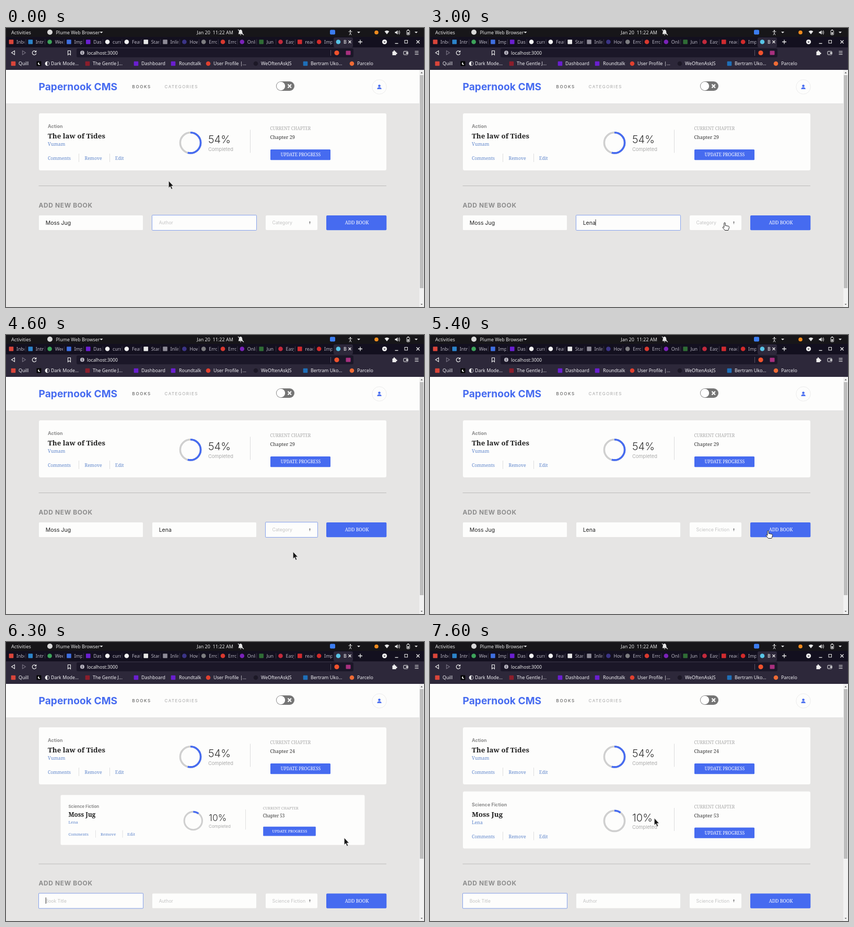
Write an HTML page that moves like this. It is 800x533 px and loops after 8 s.

```html
<!DOCTYPE html>
<html lang="en">
<head>
<meta charset="utf-8">
<title>Book manager demo</title>
<style>
html, body { margin: 0; width: 100%; height: 100%; overflow: hidden; background: #e6e5e4; }
#stage { display: block; width: 100%; height: 100%; }
text { white-space: pre; }
.ui { font-family: "Noto Sans", "Open Sans", sans-serif; }
.sans { font-family: Inter, "Open Sans", sans-serif; }
.slab { font-family: "Noto Serif", serif; font-weight: 300; }
.bold { font-weight: 700; }
.mid { font-weight: 500; }
.plain { font-weight: 400; }
.thin { font-weight: 300; }
</style>
</head>
<body>
<svg id="stage" viewBox="0 0 800 533">
  <g id="page"></g>
  <g id="chrome"></g>
  <g id="cursor"></g>
</svg>
<script>
const LOOP = 8000, STEP = 100;
const BLUE = '#466bf0', WHITE = '#fdfdfc', LINK = '#5f86cc', PALE = '#c4c4c4';
const STRIP = '#13101f', BAR = '#2d283a', FIELD = '#1b1728';
const SHIFT = 122.5;
const TITLE = 'Moss Jug', AUTHOR = 'Lena';

const $ = id => document.getElementById(id);
const rect = (x, y, w, h, fill, r = 0, more = '') =>
  `<rect x="${x}" y="${y}" width="${w}" height="${h}" rx="${r}" fill="${fill}" ${more}/>`;
const circle = (x, y, r, fill, more = '') =>
  `<circle cx="${x}" cy="${y}" r="${r}" fill="${fill}" ${more}/>`;
const path = (d, fill, more = '') => `<path d="${d}" fill="${fill}" ${more}/>`;
const line = (d, color, w = 1) => path(d, 'none', `stroke="${color}" stroke-width="${w}"`);
const text = (s, x, y, size, fill, cls, more = '') =>
  `<text x="${x}" y="${y}" font-size="${size}" fill="${fill}" class="${cls}" ${more}>${s}</text>`;
const down = (x, y, s = 3, fill = '#e8e8e8') =>
  path(`M${x - s} ${y - s / 2}h${2 * s}l${-s} ${s}z`, fill);
const move = (x, y, body) => `<g transform="translate(${x} ${y})">${body}</g>`;

// --- browser window ---

// label, icon colour, icon shape (c circle, s square)
const tabs = [
  ['Inbox', '#d9453a', 's'], ['Intro', '#2c83c9', 's'], ['Week', '#3da35a', 'c'],
  ['Impo', '#3f6fe0', 's'], ['Dash', '#6a1fd0', 's'], ['curre', '#f2f2f2', 'c'],
  ['Feat', '#f2f2f2', 'c'], ['Start', '#e6e6e6', 's'], ['Inline', '#8d8a96', 's'],
  ['How', '#3b3486', 'c'], ['Error', '#7d7d80', 'c'], ['Error', '#d8392f', 'c'],
  ['Onlin', '#7a22b8', 'c'], ['Jun', '#2f6b35', 's'], ['Easy', '#c22a3c', 'c'],
  ['react', '#cf2b2f', 's'], ['Impo', '#d22b2b', 'c'], ['B', '#58c4e6', 'c']
];

// label, text x, icon x, icon colour, shape
const bookmarks = [
  ['Quill', 24, 14, '#d9453a', 's'], ['Dark Mode...', 86, 79, '#f2f2f2', 'c'],
  ['The Gentle J...', 166, 156, '#8b1e2c', 's'], ['Dashboard', 259, 249, '#6a1fd0', 's'],
  ['Roundtalk', 331, 320, '#6a1fd0', 's'], ['User Profile |...', 397, 387, '#e0402f', 'c'],
  ['WeOftenAskJS', 488, 478, '#1c1826', 'c'], ['Bertram Uko...', 583, 573, '#1f6fb8', 's'],
  ['Parcelo', 672, 662, '#ef6b35', 'c']
];

const icon = (x, y, color, shape, r = 4.3) =>
  shape === 'c' ? circle(x, y, r, color) : rect(x - r, y - r, 2 * r, 2 * r, color, 1);

function panel() {
  const c = '#e6e6e6';
  return rect(0, 0, 800, 17, '#171619') +
    text('Activities', 10, 11.5, 9.1, c, 'ui mid') +
    circle(84, 8, 5, '#d8d8d8') +
    text('Plume Web Browser', 95.5, 11.5, 8.9, c, 'ui mid') + down(182.5, 8.5) +
    text('Jan 20\u00a0 11:22 AM', 400, 11.5, 9, c, 'ui mid', 'text-anchor="middle"') +
    path('M444.5 11.5c2-2 0-7.5 4.5-8.5c4.5 1 2.5 6.5 4.5 8.5zM447.5 12.5h3l-1.5 1.5z', c) +
    line('M444 3l11 10.5', c, 1.1) +
    rect(620, 3.5, 10, 9, '#3c7df0', 2) +
    circle(659, 5, 1.2, c) + line('M655.5 7h7M659 7v3l-2 3.5M659 10l2 3.5', c) +
    down(675, 8.5) + circle(709, 8.5, 3.8, '#ef8b1e') +
    path('M724.5 6.5q4.5-3.5 9 0l-4.5 5.5z', c) +
    path('M744.5 7h2l3-2.5v8l-3-2.5h-2z', c) +
    line('M751 6q1.5 2.5 0 5M752.5 4.5q2.5 4 0 8', c, .9) +
    rect(767, 4.5, 5.5, 8.5, 'none', 1, `stroke="${c}"`) + rect(768.5, 8, 2.5, 4, c) +
    rect(768.5, 3, 2.5, 1.5, c) + down(785, 8.5);
}

function tabStrip() {
  let s = rect(0, 17, 800, 20, STRIP) + rect(627, 18, 37, 19, BAR, 3);
  tabs.forEach(([label, color, shape], i) => {
    const x = 10 + i * 36.82, on = i === tabs.length - 1;
    s += icon(x, 26.5, color, shape) +
      `<svg x="${x + 9}" y="18" width="${on ? 10 : 16.5}" height="18">` +
      text(label, 1, 11.5, 8.9, on ? '#fff' : '#b8b5c2', 'ui') + '</svg>';
    if (i < 16) s += line(`M${x + 28} 21.5v10`, '#4a4458', .7);
  });
  const c = '#f0f0f0';
  return s + line('M655.5 24l5 5m0-5l-5 5', c, 1.2) + line('M674 26.5h8m-4-4v8', c, 1.3) +
    circle(724.5, 26.5, 4.6, c) + down(724.5, 27, 2.2, STRIP) +
    line('M744.5 29.5h6', c, 1.3) + rect(763, 23.5, 5.5, 5.5, 'none', 0, `stroke="${c}"`) +
    line('M785.5 23.5l6 6m0-6l-6 6', c, 1.3);
}

function toolbar() {
  const c = '#eeeeee';
  let s = rect(0, 37, 800, 43, BAR) + rect(135, 39, 530, 17, FIELD, 3) +
    path('M16.5 43.5v7.5l-6-3.7z', 'none', `stroke="${c}" stroke-width="1.1"`) +
    path('M31.5 43.5v7.5l6-3.7z', 'none', 'stroke="#777282" stroke-width="1.1"') +
    line('M57 45a3.8 3.8 0 1 0 .8 3.5', c, 1.2) + path('M58.3 42.5v4h-4z', c) +
    line('M118.5 43.5h5v8l-2.5-2.3l-2.5 2.3z', c, 1.1) +
    circle(146, 47.3, 4, '#b8b5c0') + line('M146 46.5v3M146 44.5v1', FIELD, 1.1) +
    text('localhost:3000', 155, 50.5, 8.7, '#f0f0f0', 'ui') +
    line('M621.5 42v11', '#5a5466') + circle(633, 47.5, 4.6, '#f0522d') +
    rect(650.5, 43.5, 9, 8, '#a8307f', 1) +
    path('M739.5 45h2.2a1.5 1.5 0 1 1 2.6 0h2.2v2.2a1.5 1.5 0 1 1 0 2.6v2.2h-7z', c) +
    rect(761, 44.5, 8, 6.5, 'none', 1, `stroke="${c}"`) + rect(765.5, 46.5, 4, 2.5, c) +
    line('M782.5 44.5h7m-7 3h7m-7 3h7', c, 1.2);
  for (const [label, x, ix, color, shape] of bookmarks)
    s += icon(ix, 68, color, shape) + text(label, x, 71.3, 8.9, '#f0eff3', 'ui');
  return s + path('M79 64.5a3.5 3.5 0 0 1 0 7z', BAR) + rect(58.5, 63.5, 9, 9, '#050505', 1) +
    path('M63.5 65.5a2.5 2.5 0 1 0 2 4a2.5 2.5 0 0 1-2-4z', c);
}

// --- web page ---

function header() {
  return rect(0, 80, 791, 64.5, WHITE) + line('M0 144.7h791', '#dddcdb', .7) +
    text('Papernook CMS', 62.5, 119, 19.2, BLUE, 'sans bold') +
    text('BOOKS', 241.5, 115.3, 8.1, '#4a4a4a', 'sans', 'letter-spacing="1.6"') +
    text('CATEGORIES', 303.5, 115.3, 8.1, '#a6a6a6', 'sans', 'letter-spacing="1.4"') +
    rect(517, 102, 35, 18, '#757575', 9) + circle(526, 111, 8.2, '#fff') +
    line('M539.5 107.8l6.4 6.4m0-6.4l-6.4 6.4', '#fff', 2.2) +
    circle(714.5, 112.5, 13.8, WHITE, 'stroke="#ececec"') +
    circle(714.5, 110.5, 2.3, BLUE) + path('M710.3 116.7q0-3.5 4.2-3.5t4.2 3.5z', BLUE);
}

function card(genre, title, author, percent, chapter) {
  const r = 19.6, around = 2 * Math.PI * r;
  const ring = (color, more = '') =>
    circle(353, 219.3, r, 'none', `stroke="${color}" stroke-width="3.6" ${more}`);
  return rect(63, 163, 665, 109, WHITE, 3) +
    text(genre, 80, 191.3, 9, '#8c8c8c', 'sans bold') +
    text(title, 80, 211, 13.4, '#1f1f1f', 'slab', 'style="font-weight:700"') +
    text(author, 80, 225, 8.9, LINK, 'slab') +
    text('Comments', 80, 252, 8.7, LINK, 'slab') +
    text('Remove', 150.5, 252, 8.7, LINK, 'slab') +
    text('Edit', 209, 252, 8.7, LINK, 'slab') +
    line('M139.5 240v16M198.5 240v16', '#dedede') +
    ring('#cfcfcf') +
    ring(BLUE, `stroke-dasharray="${around * percent / 100} ${around}" transform="rotate(-90 353 219.3)"`) +
    text(percent + '%', 387, 220.3, 20, '#333', 'sans thin') +
    text('Completed', 387, 234.5, 9.3, '#aaa', 'sans') +
    line('M467.5 194.5v44', '#dcdcdc') +
    text('CURRENT CHAPTER', 505.5, 195, 8.2, '#a8a8a8', 'slab') +
    text('Chapter ' + chapter, 505.5, 212, 9.2, '#333', 'slab') +
    rect(506, 232, 115, 20.3, BLUE, 1.5) +
    text('UPDATE PROGRESS', 564, 245, 8.3, '#fff', 'slab', 'text-anchor="middle"');
}

const focusRing = (x, w) =>
  rect(x - .5, 357.5, w, 29, 'none', 1, 'stroke="#86a2ec"');

function field(x, w, value, hint, focused, caretAt) {
  let s = rect(x, 358, w, 28, WHITE, 1.5);
  s += value ? text(value, x + 12.7, 375.5, 10.5, '#222', 'sans')
             : text(hint, x + 12.7, 375, 8.5, PALE, 'sans');
  if (focused) s += focusRing(x, w + 1);
  if (caretAt) s += line(`M${caretAt} 365.5v12`, '#222', .9);
  return s;
}

function form(f) {
  return line('M62.5 301.5h665.5', '#bdbcbb') +
    text('ADD NEW BOOK', 62.5, 342.5, 12, '#8d8d8d', 'sans bold', 'letter-spacing=".6"') +
    field(63, 199, f.title, 'Book Title', f.focus === 'title', f.focus === 'title' && f.caret) +
    field(280, 199, f.author, 'Author', f.focus === 'author', f.focus === 'author' && f.caret) +
    rect(497, 358, 99, 28, WHITE, 2) +
    text(f.genre, 509.5, 375, 8.8, PALE, 'sans') +
    path('M581.5 369l1.7 2.6h-1.2v3h-1v-3h-1.2z', '#777') +
    (f.focus === 'genre' ? focusRing(497, 100) : '') +
    rect(613, 358, 115.3, 28.3, BLUE, 2) +
    text('ADD BOOK', 671.5, 375, 8.7, '#fff', 'slab', 'text-anchor="middle"');
}

function menu(picked) {
  const h = 13.4, top = 387;
  return rect(497, top, 99, 4 * h, '#fff', 0, 'stroke="#c8c8c8" stroke-width=".6"') +
    ['Category', 'Action', 'Science Fiction', 'Economy'].map((s, i) =>
      (i === picked ? rect(497, top + i * h, 99, h, '#d2d2d2') : '') +
      text(s, 509.5, top + i * h + 9.7, 8.8, i ? '#777' : PALE, 'sans')).join('');
}

const scrollbar = bottom =>
  rect(791, 80, 9, 453, '#f1f1f1') + rect(792, 90, 7, bottom - 90, '#bdbdbd') +
  path('M793.5 86.5h4l-2-2.5z', '#555') + down(795.5, 528, 2, '#555');

// --- pointer ---

const ARROW = 'M.3 0V13.5L3.3 10.7L5.5 16L7.7 15L5.5 10H9.5Z';
const HAND = 'M-1.2 1c0-1.6 2.4-1.6 2.4 0v4.3l6 1.2q1.6.4 1.4 2l-.9 3.8-1 2.2h-6.2l-4-4.7c-1-1.4.6-2.4 1.7-1.3l.6.7z';

// time, x, y, over something clickable
const route = [
  [0, 311, 292], [2100, 330, 300], [2200, 378, 322], [2300, 447, 360],
  [2500, 512, 382, 1], [2600, 548, 384, 1], [2700, 562, 383, 1], [2900, 564, 376, 1],
  [3000, 564, 372, 1], [3700, 558, 388], [3800, 553, 402], [3900, 551, 412],
  [4200, 550, 414], [4300, 549, 414], [4700, 562, 411], [4800, 590, 400],
  [4900, 618, 388], [5000, 638, 379, 1], [5100, 645, 375, 1], [5400, 647, 374, 1],
  [5700, 647, 374], [6800, 612, 368], [6900, 545, 356], [7000, 485, 346],
  [7100, 446, 339], [7500, 434, 337], [7600, 429, 336.5]
];

const pointer = t => {
  const [, x, y, hand] = route.findLast(p => p[0] <= t);
  return move(x, y, hand
    ? path(HAND, '#fff', 'stroke="#222" stroke-width="1"')
    : path(ARROW, '#161616', 'stroke="#eee" stroke-width=".7"'));
};

// --- timeline ---

// CSS "ease" curve, solved by bisection
function ease(p) {
  if (p <= 0) return 0;
  if (p >= 1) return 1;
  const curve = (u, a, b) => 3 * u * (1 - u) ** 2 * a + 3 * u * u * (1 - u) * b + u ** 3;
  let lo = 0, hi = 1;
  for (let i = 0; i < 24; i++) {
    const mid = (lo + hi) / 2;
    if (curve(mid, .25, .25) < p) lo = mid; else hi = mid;
  }
  return curve(lo, .1, 1);
}

const TYPE = 1100, PICK = 3400, CHOSEN = 4500, PRESS = 5400, ADDED = 5900;
const blink = since => since >= 0 && since % 1000 < 500;

function formState(t) {
  if (t >= ADDED)
    return { title: '', author: '', genre: 'Science Fiction', focus: 'title',
             caret: blink(t - ADDED) && 76.3 };
  const typed = t < TYPE ? 0 : Math.min(4, 1 + Math.floor((t - TYPE) / 200));
  const on = t < TYPE ? blink(t - 400) : t < 1700 || blink(t - 1700);
  return {
    title: TITLE, author: AUTHOR.slice(0, typed),
    genre: t < CHOSEN + 200 ? 'Category' : 'Science Fiction',
    focus: t < PICK ? 'author' : t < PRESS ? 'genre' : '',
    caret: on && 293 + 6 * typed
  };
}

function pageAt(t) {
  const added = t >= ADDED;
  let s = rect(0, 80, 800, 453, '#e6e5e4') + header() +
    card('Action', 'The law of Tides', 'Vumam', 54, added ? 24 : 29) +
    move(0, added ? SHIFT : 0, form(formState(t)));
  if (added) {
    const k = .5 + .5 * ease((t - 5812) / 1080);
    s += `<g transform="translate(395.5 340) scale(${k}) translate(-395.5 -217.5)">` +
      card('Science Fiction', TITLE, AUTHOR, 10, 53) + '</g>';
  }
  if (t >= PICK && t < CHOSEN) s += menu(t < 3900 ? 0 : 2);
  return s + scrollbar(added ? 414 : 497);
}

$('chrome').innerHTML = tabStrip() + toolbar() + panel();

const start = performance.now();
let shown = -1;
function frame() {
  const t = Math.floor(Math.max(0, performance.now() - start) % LOOP / STEP) * STEP;
  if (t !== shown) {
    shown = t;
    $('page').innerHTML = pageAt(t);
    $('cursor').innerHTML = pointer(t);
  }
  requestAnimationFrame(frame);
}
frame();
</script>
</body>
</html>
```
